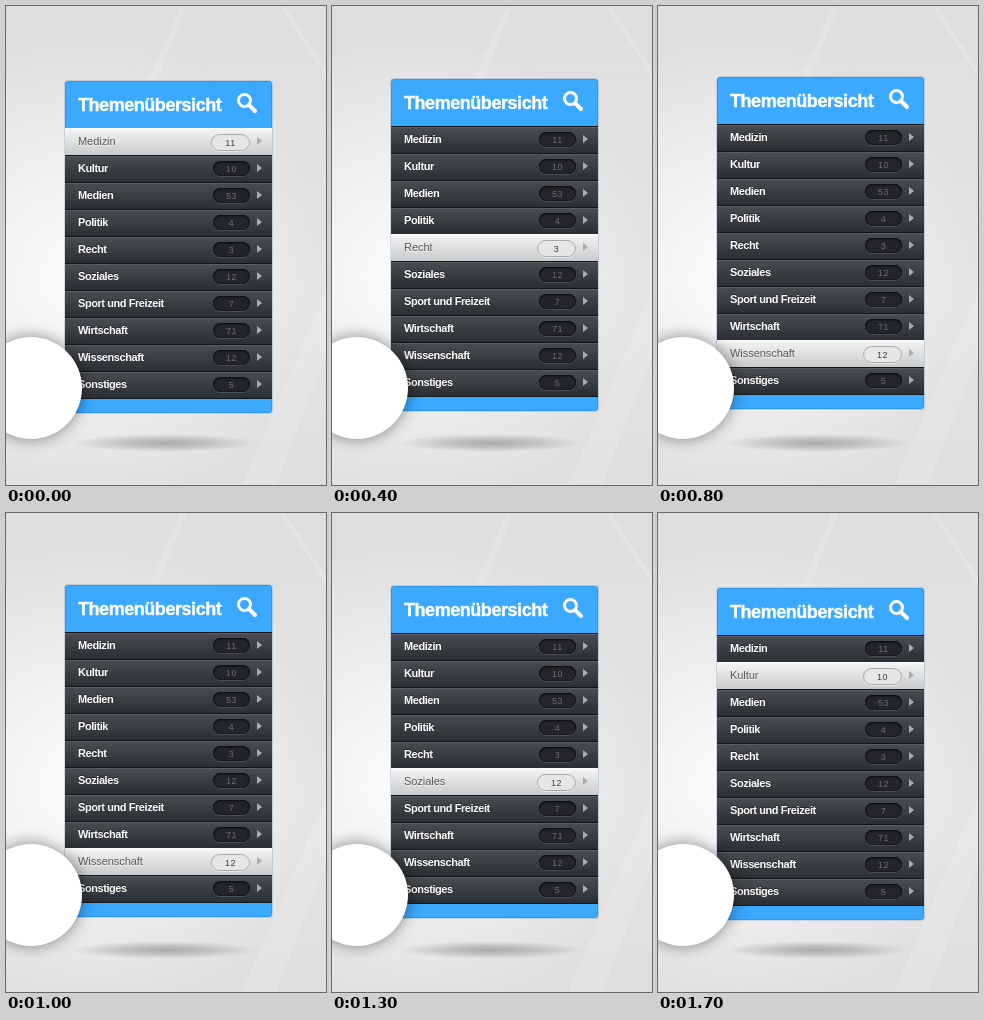
Recreate the animation shown at these times as an HTML page. Size 320 by 479 pixels, loop 1.8 s.

```html
<!DOCTYPE html>
<html lang="de">
<head>
<meta charset="utf-8">
<title>Themenübersicht</title>
<style>
  html, body { margin: 0; width: 100%; height: 100%; overflow: hidden; }
  body { background: #e2e2e2; font-family: "Liberation Sans", Arial, sans-serif; }
  .stage { position: relative; width: 320px; height: 479px; overflow: hidden; }
  .stage > * { position: absolute; }
  .back { left: 0; top: 0; }

  .panel {
    left: 59px; top: 75px; width: 207px; height: 332px; box-sizing: border-box;
    border: 1px solid #2f98e8; border-radius: 3px; background: #3aa9ff;
    box-shadow: 0 0 0 1px rgba(40, 110, 170, .2);
    animation: lift 1.8s infinite;
  }
  .panel > * { position: absolute; }
  h1 {
    left: 12px; top: 13px; margin: 0; color: #fff;
    font: bold 18px/20px "Liberation Sans", Arial, sans-serif; letter-spacing: -.45px;
    -webkit-text-stroke: .4px #fff;
  }
  .search { left: 170px; top: 9px; }

  .list {
    left: -1px; top: 46px; width: 207px; margin: 0; padding: 0; list-style: none;
    font: bold 11px/26px "Liberation Sans", Arial, sans-serif; letter-spacing: -.43px; color: #fff;
  }
  .dark { border-bottom: 1px solid #15191d; }
  .list li {
    position: relative; height: 27px; padding-left: 13px; box-sizing: border-box;
    background: linear-gradient(#121416 1px, #5a5e62 1px, #5a5e62 2px, #484c50 2px, #2b2e32);
    text-shadow: 0 -1px rgba(0, 0, 0, .4);
  }
  .list b {
    position: absolute; left: 148px; top: 6px; width: 37px; height: 15px; border-radius: 8px;
    background: #232528; color: #6a6e72; text-align: center; text-shadow: none;
    font: 9px/16px "Liberation Sans", Arial, sans-serif; letter-spacing: .6px;
    box-shadow: inset 0 1px 2px #0b0c0d, inset 0 0 0 1px #191b1d, 0 1px rgba(255, 255, 255, .12);
  }
  .list li::after {
    content: ""; position: absolute; left: 192px; top: 9px;
    border: solid transparent; border-width: 4px 0 4px 5px; border-left-color: #a9acaf;
  }

  .light { font-weight: normal; letter-spacing: -.05px; color: #55585b; animation: pick 1.8s infinite; }
  .light li {
    background: linear-gradient(#fcfcfc, #f0f0f0 3px, #c9cbcc);
    text-shadow: 0 1px rgba(255, 255, 255, .7);
  }
  .light b {
    left: 146px; width: 39px; height: 17px; border-radius: 9px; box-sizing: border-box;
    border: 1px solid #a6a8aa; background: #e5e6e7; color: #3c3e40; box-shadow: 0 1px rgba(255, 255, 255, .5);
  }

  .disc {
    left: -26px; top: 331px; width: 102px; height: 102px; border-radius: 50%;
    background: #fff; box-shadow: 0 0 16px rgba(0, 0, 0, .45);
  }

  @keyframes lift {
    0% { transform: translateY(0); animation-timing-function: steps(4); }
    44.4444% { transform: translateY(-4px); animation-timing-function: step-end; }
    55.5555% { transform: translateY(-4px); animation-timing-function: steps(4, start); }
    100% { transform: translateY(0); }
  }
  @keyframes pick {
    0%, 100% { clip-path: inset(0 0 243px 0); animation-timing-function: steps(9); }
    50% { clip-path: inset(243px 0 0 0); animation-timing-function: steps(9); }
  }
</style>
</head>
<body>
<div class="stage">
  <svg class="back" width="320" height="479">
    <defs>
      <linearGradient id="wall" x2="0" y2="1">
        <stop offset="0" stop-color="#dedede"/>
        <stop offset=".6" stop-color="#e5e5e5"/>
        <stop offset="1" stop-color="#dedede"/>
      </linearGradient>
      <radialGradient id="glow" gradientUnits="userSpaceOnUse" cx="80" cy="270" r="240">
        <stop offset="0" stop-color="#fff" stop-opacity=".9"/>
        <stop offset="1" stop-color="#fff" stop-opacity="0"/>
      </radialGradient>
      <radialGradient id="shade">
        <stop offset="0" stop-color="#000" stop-opacity=".26"/>
        <stop offset=".5" stop-color="#000" stop-opacity=".15"/>
        <stop offset="1" stop-color="#000" stop-opacity="0"/>
      </radialGradient>
    </defs>
    <path fill="url(#wall)" d="M0 0H320V479H0z"/>
    <path fill="url(#glow)" d="M0 0H320V479H0z"/>
    <g fill="#fff" opacity=".16">
      <path d="M174 0H181L150 76H142z"/>
      <path d="M274 0H279L320 64V72z"/>
      <path d="M320 285 236 479H270L320 350z"/>
    </g>
    <ellipse cx="158" cy="437" rx="92" ry="9" fill="url(#shade)"/>
  </svg>

  <div class="panel">
    <h1>Themenübersicht</h1>
    <svg class="search" width="26" height="26" fill="none" stroke="#fff">
      <circle cx="8.5" cy="9.5" r="6" stroke-width="3"/>
      <path d="M13 14 19 20" stroke-width="4" stroke-linecap="round"/>
    </svg>
    <ul class="list dark"></ul>
    <ul class="list light" aria-hidden="true"></ul>
  </div>

  <div class="disc"></div>
</div>
<script>
  const topics = {
    Medizin: 11, Kultur: 10, Medien: 53, Politik: 4, Recht: 3, Soziales: 12,
    "Sport und Freizeit": 7, Wirtschaft: 71, Wissenschaft: 12, Sonstiges: 5
  };
  const rows = Object.entries(topics).map(([name, n]) => `<li>${name}<b>${n}</b></li>`).join("");
  for (const list of document.querySelectorAll(".list")) list.innerHTML = rows;
</script>
</body>
</html>
```
